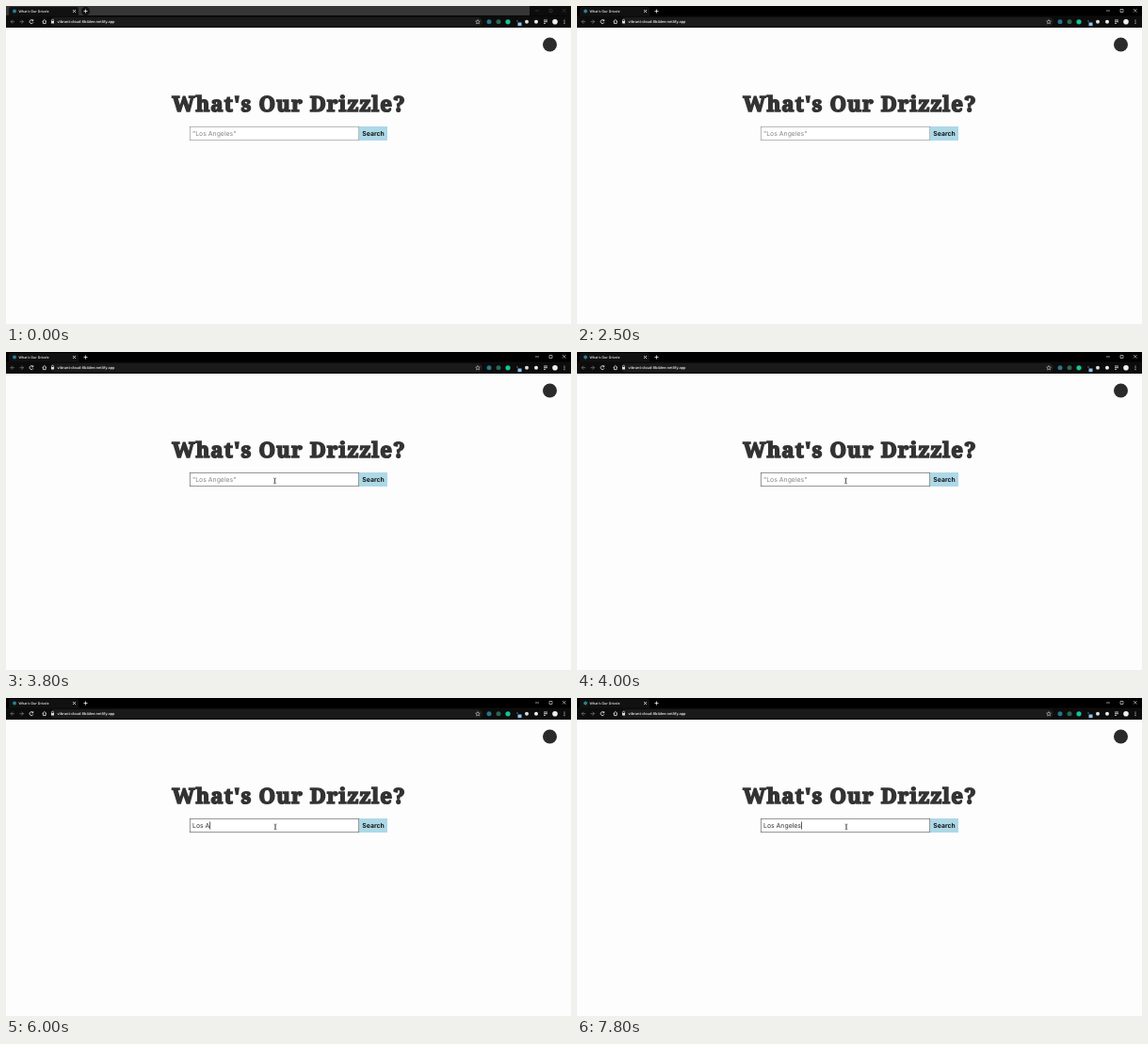
An HTML page for the animation above (8 s loop, 600 by 338 pixels).

```html
<!DOCTYPE html>
<html lang="en">
<head>
<meta charset="utf-8">
<title>What's Our Drizzle</title>
<style>
  html, body { margin: 0; width: 100%; height: 100%; overflow: hidden; background: #fdfdfe; }
  svg { display: block; width: 100%; height: 100%; }
  text { white-space: pre; text-rendering: geometricPrecision; }
  .ui { font: 600 3.9px "Open Sans", sans-serif; fill: #f0f0f0; }
  .form { font: 6.9px Inter, sans-serif; }
  .line { fill: none; stroke: #eee; stroke-width: .8; }
  #title { font: 900 22.3px "Noto Serif", serif; letter-spacing: 1.1px; fill: #333; stroke: #333; stroke-width: 1.6; }
</style>
</head>
<body>
<svg viewBox="0 0 600 338">
  <!-- browser frame -->
  <rect width="600" height="23" fill="#000"/>
  <g id="inactive">
    <rect width="600" height="10" fill="#363636"/>
    <rect x="556" width="44" height="10" fill="#0c0c0c"/>
    <circle cx="84.5" cy="5.5" r="4.5" fill="#111"/>
  </g>
  <path d="M1 11q2 0 2-3V3q0-2 2-2h70q2 0 2 2v5q0 3 2 3z" fill="#111"/>
  <rect y="10.5" width="600" height="12.5" fill="#0c0c0c"/>
  <rect x="47" y="12" width="459" height="9.5" rx="4.7" fill="#1a1a1a"/>
  <circle cx="9" cy="5.5" r="2" fill="#2b7f96"/>
  <text class="ui" x="13.5" y="7" style="font-size:3.6px">What's Our Drizzle</text>
  <text class="ui" x="54.5" y="18.2">vibrant-cloud-8b4dee.netlify.app</text>
  <g class="line">
    <path d="M71 4l3 3m0-3l-3 3M82.500 5.500h4m-2-2v4"/>
    <path id="controls" d="M562 5h4M577 3.500h3v3h-3zM591 3l3.500 3.500m0-3.500l-3.500 3.500" stroke-width=".6"/>
    <path d="M9 16.700H5m2-2l-2 2 2 2M14.500 16.700h4m-2-2l2 2-2 2" stroke="#777"/>
    <path d="M28.600 15.400a2 2 0 1 0 .3 2M28.800 14.200v1.600h-1.600M38.600 16.500l2.200-2 2.200 2M39.400 16v2.600h2.800V16"/>
    <path d="M48.500 16.200v-1a1 1 0 0 1 2 0v1" stroke-width=".6"/>
    <path d="M571 15h4m-4 1.700h4m-4 1.700h2"/>
    <path d="M501 14.500l.7 1.500 1.600.2-1.200 1.100.3 1.600-1.400-.8-1.400.8.3-1.600-1.200-1.100 1.600-.2z" stroke-width=".5"/>
  </g>
  <rect x="48" y="16" width="3" height="2.500" fill="#ddd"/>
  <g id="icons"></g>

  <!-- page -->
  <rect y="23" width="600" height="315" fill="#fdfdfe"/>
  <circle cx="577.500" cy="41" r="7.500" fill="#2b2b2b"/>
  <text id="title" x="300.500" y="112.300" text-anchor="middle">What's Our Drizzle?</text>
  <rect id="box" x="195.300" y="128.300" width="179.400" height="14.400" fill="#fff" stroke-width=".7"/>
  <rect x="375" y="128" width="30" height="15" fill="#add8e6"/>
  <text class="form" x="390" y="137.900" text-anchor="middle" style="font-weight:600">Search</text>
  <text class="form" id="query" x="198" y="137.900"></text>
  <rect id="caret" y="131.500" width=".7" height="8" fill="#111"/>
  <path id="arrow" d="M0 0v9l2.100-2 1.500 3.400 1.400-.6-1.500-3.300h3z" fill="#fff" stroke="#111" stroke-width=".6"/>
  <path id="beam" d="M-1.500-3q1.500 0 1.500 1v4q0 1-1.500 1M1.500-3q-1.500 0-1.500 1v4q0 1 1.500 1" fill="none" stroke="#333" stroke-width=".6"/>
</svg>
<script>
const $ = id => document.getElementById(id);
const LOOP = 8000;
const TEXT = 'Los Angeles';
const keyTimes = [4900, 5200, 5300, 5800, 6000, 6200, 6400, 7300, 7500, 7700, 7800];
// pointer path: time, x, y
const path = [[2600, 598, 158], [2900, 460, 120], [3300, 301, 50], [3500, 284, 121], [3700, 285.5, 137], [4400, 285.5, 137], [4500, 286, 137]];

// toolbar dots: x, radius, colour, y
const icons = [[513, 2.5, '#28758c'], [523, 2.5, '#2d6653'], [533, 2.6, '#15c39a'], [543, 0.8, '#777', 16],
  [553, 2, '#ddd'], [563, 2, '#eee'], [583, 2.8, '#eee'], [593, .6, '#ddd', 15], [593, .6, '#ddd'], [593, .6, '#ddd', 18.6]];
$('icons').innerHTML = icons.map(([x, r, c, y = 16.8]) =>
  `<circle cx="${x}" cy="${y}" r="${r}" fill="${c}"/>`).join('') +
  '<rect x="543.5" y="17.5" width="4" height="3.5" fill="#8cc4ee"/>';

const show = (id, on) => $(id).style.display = on ? '' : 'none';

function pointerAt(t) {
  const i = path.findIndex(p => p[0] > t);
  if (i < 0) return path.at(-1).slice(1);
  if (i === 0) return path[0].slice(1);
  const [a, b] = [path[i - 1], path[i]];
  const k = (t - a[0]) / (b[0] - a[0]);
  return [a[1] + (b[1] - a[1]) * k, a[2] + (b[2] - a[2]) * k];
}

function draw(now) {
  const t = now % LOOP;
  const typed = keyTimes.filter(k => k <= t).length;
  const idle = t < 2500;
  const overInput = t >= 3700;
  const query = $('query');

  show('inactive', idle);
  $('controls').setAttribute('stroke', idle ? '#444' : '#eee');
  $('box').setAttribute('stroke', overInput ? '#666' : '#999');

  query.textContent = typed ? TEXT.slice(0, typed) : '"Los Angeles"';
  query.setAttribute('fill', typed ? '#333' : '#858585');
  $('caret').setAttribute('x', 198 + (typed ? query.getSubStringLength(0, typed) : 0));
  show('caret', t >= 4400 && !(t >= 6800 && t < 7100));

  show('arrow', t >= 2600 && !overInput);
  show('beam', overInput);
  const [x, y] = pointerAt(t);
  $(overInput ? 'beam' : 'arrow').setAttribute('transform', `translate(${x} ${y})`);
  requestAnimationFrame(draw);
}
requestAnimationFrame(draw);
</script>
</body>
</html>
```
